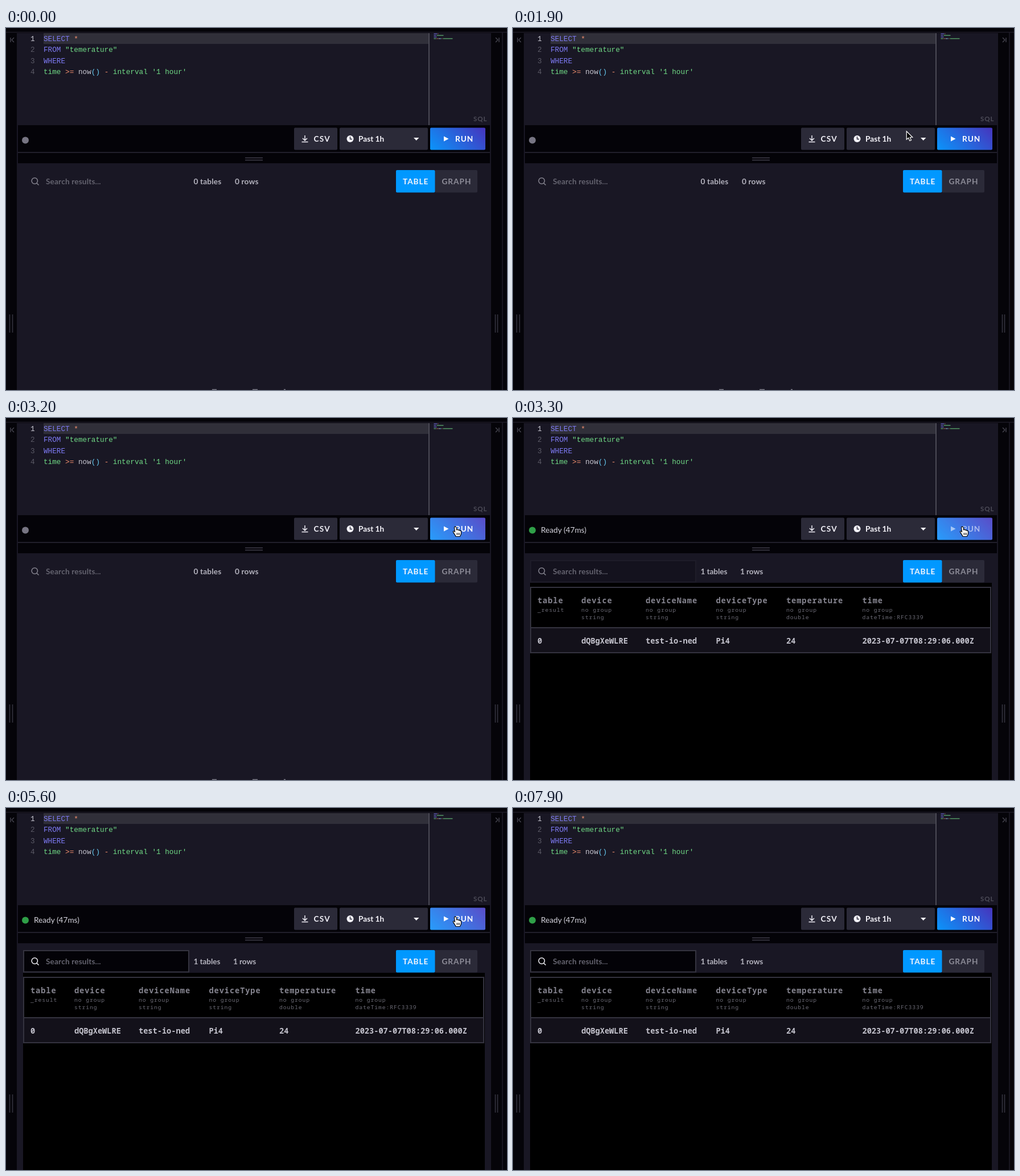
Recreate the animation shown at these times as an HTML page. Size 880 by 637 pixels, loop 8000 ms.

```html
<!DOCTYPE html>
<html lang="en">
<head>
<meta charset="utf-8">
<style>
html, body { margin: 0; width: 100%; height: 100%; overflow: hidden; background: #050409; }
svg { display: block; width: 880px; height: 637px; }
text { white-space: pre; font: 700 13.65px Lato, "Open Sans", sans-serif; }
.code text { font: 12.7px "Liberation Mono", "Courier New", monospace; }
.caps { letter-spacing: .95px; }
.cell { font: 700 13.65px "Noto Sans Mono", "DejaVu Sans Mono", monospace; fill: #c4c3cd; }
.head { font: 700 13.65px "Noto Sans Mono", "DejaVu Sans Mono", monospace; letter-spacing: .92px; fill: #85848f; }
.note { font: 9.75px "Noto Sans Mono", "DejaVu Sans Mono", monospace; letter-spacing: .9px; fill: #6b6a75; }
</style>
</head>
<body>
<svg viewBox="0 0 880 637">
  <defs>
    <linearGradient id="blue" gradientUnits="userSpaceOnUse" x1="760" y1="229" x2="827" y2="161">
      <stop stop-color="#0a95fb"/><stop offset="1" stop-color="#4634bd"/>
    </linearGradient>
  </defs>
  <rect width="880" height="637" fill="#050409"/>
  <path d="M0 7.5H880M872 8V637" stroke="#1d1b27" stroke-width="1.6" fill="none"/>
  <rect x="19" y="9" width="833" height="628" fill="#191724"/>

  <!-- side panels -->
  <g fill="none" stroke="#4a4955" stroke-width="1.3">
    <path d="M8 17V25M14 17L10 21L14 25M866 17V25M860 17L864 21L860 25"/>
    <path d="M6.5 504V536M11.5 504V536M859.5 504V536M863.5 504V536" stroke="#34333f" stroke-width="1.6"/>
  </g>

  <!-- editor -->
  <rect x="66" y="9" width="676" height="19" fill="#302f39"/>
  <rect x="742" y="9" width="2" height="162" fill="#4b4a55"/>
  <g class="code" id="code"></g>
  <g id="map"></g>
  <text class="caps" x="821" y="164" fill="#4c4b57" style="font-size:11.5px">SQL</text>

  <!-- toolbar -->
  <rect x="21" y="171" width="829" height="67" fill="#040308"/>
  <path d="M21 219H850" stroke="#211f2b" stroke-width="2"/>
  <path d="M420 228.5H451M420 232.5H451" stroke="#403f4b" stroke-width="1.5"/>
  <circle id="dot" cx="34" cy="197.5" r="6"/>
  <text id="ready" x="49" y="202" fill="#d6d5de" style="font-weight:400">Ready (47ms)</text>
  <g fill="#2b2a38">
    <rect x="506" y="175.500" width="76" height="39" rx="2"/>
    <rect x="586" y="175.500" width="155" height="39" rx="2"/>
    <rect x="753" y="250" width="75" height="39.500" rx="2"/>
  </g>
  <path d="M525 189V197M521 194L525 198L529 194M519.500 200.500H530.500" fill="none" stroke="#f1f0f7" stroke-width="1.5"/>
  <text x="540.500" y="200" fill="#f1f0f7" style="letter-spacing:1.2px">CSV</text>
  <circle cx="604.500" cy="195" r="6" fill="#f6f5fb"/>
  <path d="M604.500 191V195.500H608" fill="none" stroke="#2b2a38" stroke-width="1.4"/>
  <text x="619" y="200" fill="#f6f5fb">Past 1h</text>
  <path d="M716 193H725.500L720.700 198Z" fill="#f6f5fb"/>
  <rect x="745" y="175.500" width="97" height="39" rx="2" fill="url(#blue)"/>
  <rect id="glow" x="745" y="175.500" width="97" height="39" rx="2" fill="#b9c4ff"/>
  <g id="run" fill="#fff">
    <path d="M769 190.500L777.500 195L769 199.500Z"/>
    <text class="caps" x="789" y="200">RUN</text>
  </g>

  <!-- results -->
  <g id="peek" fill="#7b7a86">
    <rect x="362" y="635.500" width="8" height="2"/>
    <rect x="433" y="635.500" width="9" height="2"/>
    <rect x="488" y="635.500" width="3" height="2"/>
  </g>
  <g id="table">
    <rect x="30" y="290" width="811" height="347" fill="#000"/>
    <rect x="31" y="298" width="808" height="115" fill="#000"/>
    <rect x="31" y="369" width="808" height="44" fill="#13111a"/>
    <path d="M31 298H839V413H31ZM31 369H839" fill="none" stroke="#34333f" stroke-width="2"/>
    <g id="cells"></g>
  </g>
  <rect id="box" x="31" y="251" width="290" height="37.500" fill="#030207" stroke="#34333f" stroke-width="2"/>
  <path id="lens" d="M55.500 269A5.200 5.200 0 1 0 45.100 269A5.200 5.200 0 1 0 55.500 269M54 273L57.500 276.500" fill="none" stroke-width="1.5"/>
  <text x="70" y="275" fill="#64636f" style="letter-spacing:.15px">Search results...</text>
  <text id="tables" x="329.500" y="275" fill="#b3b2bd"></text>
  <text id="rows" y="275" fill="#b3b2bd"></text>
  <rect x="685" y="250" width="68.500" height="39.500" rx="2" fill="#0098ff"/>
  <text class="caps" x="697" y="275" fill="#f6f5fb">TABLE</text>
  <text class="caps" x="765.500" y="275" fill="#8e8d99">GRAPH</text>

  <!-- pointers, each with its hot spot at 0,0 -->
  <path id="arrow" d="M0 0V14.500L3.300 11.500L5.600 16.800L8.200 15.700L6 10.500H10.500Z" fill="#000" stroke="#fff" stroke-width="1.200"/>
  <g id="hand" stroke="#000" stroke-linejoin="round">
    <path d="M-3.500 -6C-3.500 -8.500 -.3 -8.500 0 -6L.5 -2C1 -3.500 3 -3 3.300 -1.500C4 -2.700 6 -2 6 -.5C7 -1.500 8.500 -.5 8.500 1V4C8.500 7 7 7 6.500 9.500H-1C-1.500 7 -4 5 -5.500 1.500C-6 -.2 -4 -.8 -2.500 1.500Z" fill="#fff" stroke-width="1.200"/>
    <path d="M1 3V7M3.200 3V7M5.400 3V7" stroke-width=".9"/>
  </g>
</svg>
<script>
const LOOP = 8000, RESULT = 3300, HOVER = 2200, GONE = 6900;
const $ = id => document.getElementById(id);
const clamp = v => Math.max(0, Math.min(1, v));
const ease = v => v * v * (3 - 2 * v);

function add(parent, tag, attrs, text = '') {
  const el = document.createElementNS('http://www.w3.org/2000/svg', tag);
  for (const k in attrs) el.setAttribute(k, attrs[k]);
  el.textContent = text;
  parent.append(el);
  return el;
}

const KEY = '#7f7bf5', STR = '#70da85', OP = '#f5906f', ID = '#c9c8d2', PAREN = '#67cdf5';
const lines = [
  [['SELECT', KEY], [' *', OP]],
  [['FROM', KEY], [' "temerature"', STR]],
  [['WHERE', KEY]],
  [['time', STR], [' >=', OP], [' now', ID], ['()', PAREN], [' -', OP], [" interval '1 hour'", STR]]
];
lines.forEach((parts, i) => {
  const y = 22.5 + i * 19.5;
  add($('code'), 'text', { x: 43, y, fill: i ? '#5b5a66' : '#c9c8d2' }, i + 1);
  const row = add($('code'), 'text', { x: 66, y });
  let col = 0;
  for (const [s, fill] of parts) {
    add(row, 'tspan', { fill }, s);
    const lead = s.length - s.trimStart().length;
    add($('map'), 'rect', { x: 751.5 + col + lead, y: 9.5 + i * 2.8, width: s.length - lead, height: 1.5, fill, opacity: .65 });
    col += s.length;
  }
});

const columns = [
  [43, 'table', '_result', '', '0'],
  [120, 'device', 'no group', 'string', 'dQBgXeWLRE'],
  [233, 'deviceName', 'no group', 'string', 'test-io-ned'],
  [356.5, 'deviceType', 'no group', 'string', 'Pi4'],
  [480, 'temperature', 'no group', 'double', '24'],
  [613.5, 'time', 'no group', 'dateTime:RFC3339', '2023-07-07T08:29:06.000Z']
];
for (const [x, name, group, type, value] of columns) {
  const put = (cls, y, s) => add($('cells'), 'text', { class: cls, x, y }, s);
  put('head', 325.5, name);
  put('note', 341, group);
  put('note', 353.5, type);
  put('cell', 396.5, value);
}

// time, x, y
const path = [[600, 882, 128], [1100, 549, 159], [1400, 549, 159], [2300, 793, 198], [2700, 793, 198], [3000, 791, 199]];

function pointer(t) {
  let i = 0;
  while (i < path.length - 2 && t > path[i + 1][0]) i++;
  const [t0, x0, y0] = path[i], [t1, x1, y1] = path[i + 1];
  const k = ease(clamp((t - t0) / (t1 - t0)));
  return [x0 + (x1 - x0) * k, y0 + (y1 - y0) * k];
}

const show = (id, opacity) => $(id).setAttribute('opacity', +opacity);

function draw(now) {
  const t = Math.floor(now % LOOP / 100) * 100;
  const done = t >= RESULT;
  const n = done ? 1 : 0;
  const [x, y] = pointer(t);
  const visible = t >= path[0][0] && t < GONE;
  const over = x > 745 && y > 175.5;

  $('arrow').setAttribute('transform', `translate(${x} ${y})`);
  $('hand').setAttribute('transform', `translate(${x} ${y})`);
  show('arrow', visible && !over);
  show('hand', visible && over);
  show('glow', .17 * clamp((t - HOVER - 200) / 300) * clamp(1 - (t - GONE) / 300));

  $('dot').setAttribute('fill', done ? '#2f9f48' : '#777583');
  show('ready', done);
  show('table', done);
  show('peek', !done);
  show('run', t === RESULT ? .55 : 1);
  show('box', done ? clamp(.2 + (t - RESULT) / 250) : 0);
  $('lens').setAttribute('stroke', t > RESULT + 100 ? '#f1f0f7' : '#85848f');
  $('tables').textContent = n + ' tables';
  $('rows').textContent = n + ' rows';
  $('rows').setAttribute('x', done ? 399 : 402);
  for (const id of ['tables', 'rows']) $(id).style.letterSpacing = done ? '-.1px' : '.15px';
}

const start = performance.now();
(function frame() {
  draw(performance.now() - start);
  requestAnimationFrame(frame);
})();
</script>
</body>
</html>
```
